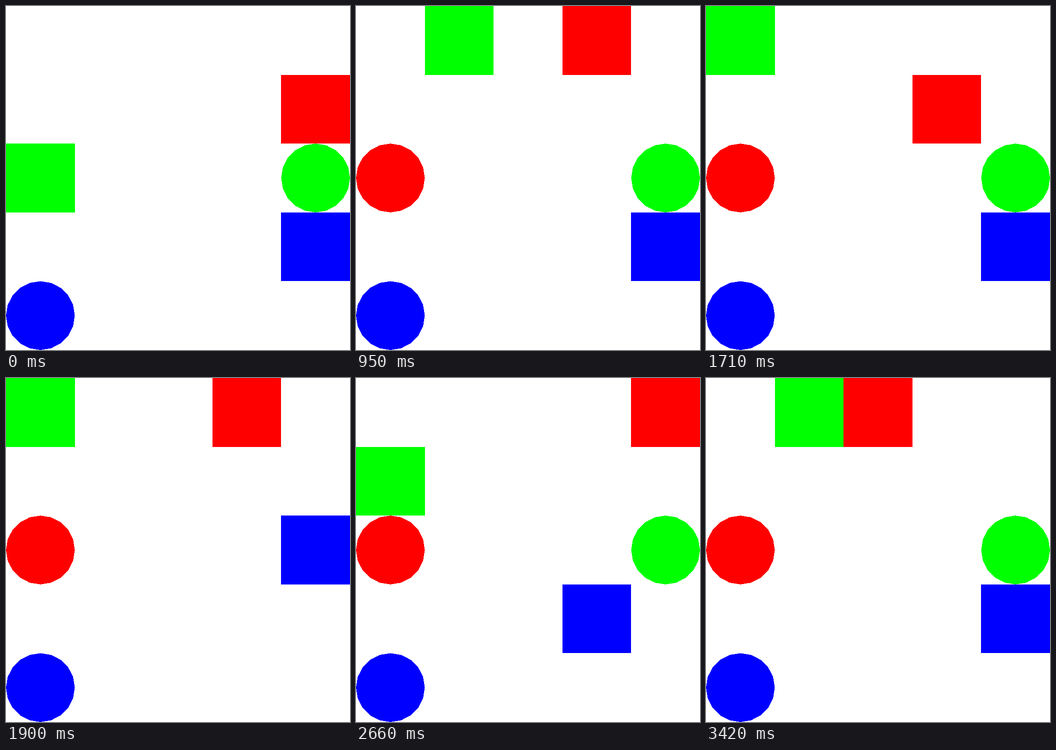
An HTML page with a canvas for the animation above (3610 ms loop, 748 by 748 pixels).

```html
<!DOCTYPE html>
<html lang="en">
<head>
<meta charset="utf-8">
<title>Grid walkers</title>
<style>
  html, body { margin: 0; width: 100%; height: 100%; overflow: hidden; background: #fff; }
  canvas { display: block; }
</style>
</head>
<body>
<canvas width="748" height="748"></canvas>
<script>
const SIZE = 748, CELL = SIZE / 5, TICK = 190, LOOP = 19 * TICK;
const RED = '#f00', GREEN = '#0f0', BLUE = '#00f';
const ctx = document.querySelector('canvas').getContext('2d');

const goals = [
  { color: RED, col: 0, row: 2 },
  { color: GREEN, col: 4, row: 2 },
  { color: BLUE, col: 0, row: 4 }
];

// One letter per tick: up, down, left, right or wait
const walkers = [
  { color: RED, col: 4, row: 1, moves: 'L..U...D.UR...LL..' },
  { color: GREEN, col: 0, row: 2, moves: '.R.UU.DLU...D.UR..' },
  { color: BLUE, col: 4, row: 3, moves: '......U.DULRLDRD.U' }
];

// Whole-pixel box, so that every edge stays hard
function fillBox(left, top, right, bottom) {
  const [x, y] = [Math.round(left), Math.round(top)];
  ctx.fillRect(x, y, Math.round(right) - x, Math.round(bottom) - y);
}

// Half the width of a 20-sided disc at height dy from its centre
function halfWidth(dy, r) {
  const turn = Math.PI / 10;
  const a = Math.floor(Math.asin(Math.abs(dy) / r) / turn) * turn, b = a + turn;
  const part = (Math.abs(dy) / r - Math.sin(a)) / (Math.sin(b) - Math.sin(a));
  return r * (Math.cos(a) + part * (Math.cos(b) - Math.cos(a)));
}

function drawDisc({ color, col, row }) {
  const r = CELL / 2, cx = col * CELL + r, cy = row * CELL + r;
  ctx.fillStyle = color;
  for (let y = Math.round(cy - r); y < Math.round(cy + r); y++) {
    const half = halfWidth(y + 0.5 - cy, r);
    fillBox(cx - half, y, cx + half, y + 1);
  }
}

function drawSquare({ color, col, row, moves }, tick) {
  for (const move of moves.slice(0, tick)) {
    col += (move === 'R') - (move === 'L');
    row += (move === 'D') - (move === 'U');
  }
  ctx.fillStyle = color;
  fillBox(col * CELL, row * CELL, (col + 1) * CELL, (row + 1) * CELL);
}

function draw() {
  const tick = Math.floor(performance.now() % LOOP / TICK);
  ctx.fillStyle = '#fff';
  ctx.fillRect(0, 0, SIZE, SIZE);
  goals.forEach(drawDisc);
  walkers.forEach(walker => drawSquare(walker, tick));
  requestAnimationFrame(draw);
}
draw();
</script>
</body>
</html>
```
